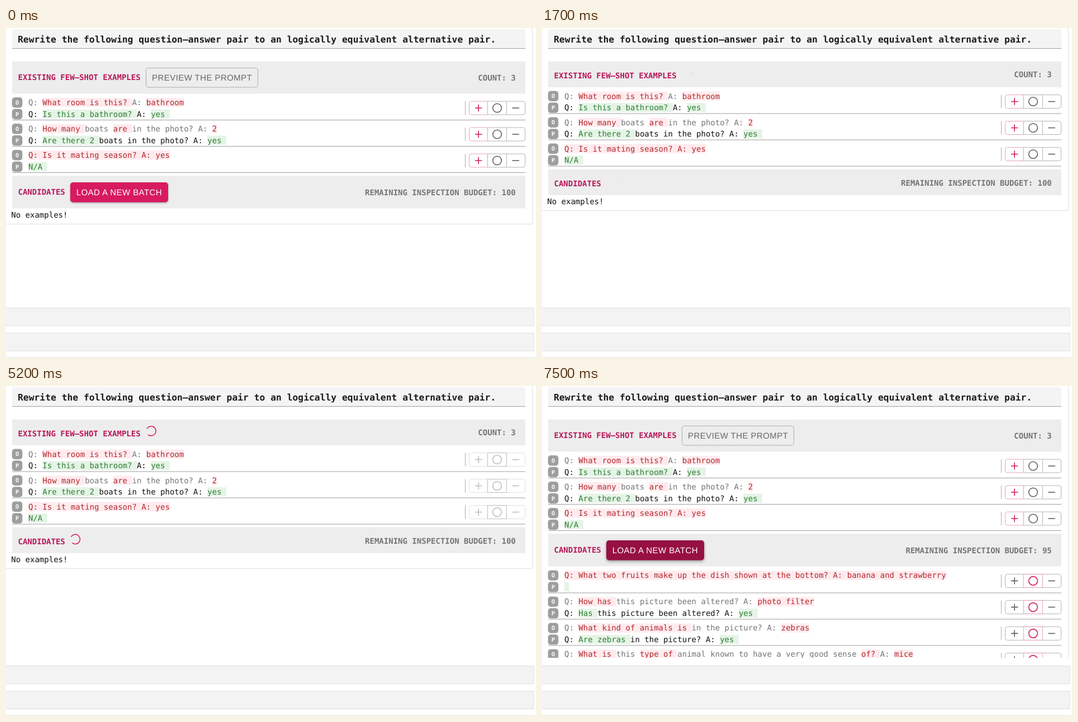
These frames come from a looping animation (948 px wide and 590 px high, 8.6 s). An HTML page:

```html
<!DOCTYPE html>
<html lang="en">
<head>
<meta charset="utf-8">
<title>Few-shot examples</title>
<style>
html, body { margin: 0; width: 100%; height: 100%; overflow: hidden; background: #fff; }
svg { display: block; width: 948px; height: 590px; }
text { font: 14px "DejaVu Sans Mono", monospace; white-space: pre; text-rendering: geometricPrecision; fill: #111; }
.title { font-size: 16.33px; font-weight: 700; fill: #1c1c1c; }
.head { font-weight: 700; fill: #b8185a; }
.count { font-weight: 700; fill: #757575; text-anchor: end; }
.btn { font: 15px "Liberation Sans", sans-serif; letter-spacing: .43px; text-anchor: middle; }
.badge { font-size: 10px; font-weight: 700; fill: #fff; text-anchor: middle; }
.old { fill: #757575; }
.del { fill: #b3272d; }
.ins { fill: #2e7d32; }
.line { stroke: #9e9e9e; }
.soft { stroke: #e0e0e0; fill: none; }
.icon { fill: none; stroke-width: 1.6; }
.on { opacity: var(--on); }
.off { opacity: calc(1 - var(--on)); }
</style>
</head>
<body>
<svg id="stage" viewBox="0 0 948 590"></svg>
<script>
const LOOP = 8600, HOVER = 1200, PRESS = 1450, LOAD = 1700, DONE = 7300, SPIN = 1420;
const CHAR = 8.428, PITCH = 47;
const PINK = '#d81b60', GREY = '#5f5f5f';

// Marked text: [changed words], everything else is unchanged.
const existing = [
  ['Q: [What room is this? ]A: [bathroom]', 'Q: [Is this a bathroom? ]A: [yes ]'],
  ['Q: [How many ]boats [are ]in the photo? A: [2]', 'Q: [Are there 2 ]boats in the photo? A: [yes ]'],
  ['[Q: Is it mating season? A: yes]', '[N/A ]']
];
const candidates = [
  ['[Q: What two fruits make up the dish shown at the bottom? A: banana and strawberry]', '[ ]'],
  ['Q: [How has ]this picture been altered? A: [photo filter]', 'Q: [Has ]this picture been altered? A: [yes ]'],
  ['Q: [What kind of animals is ]in the picture? A: [zebras]', 'Q: [Are zebras ]in the picture? A: [yes ]'],
  ['Q: [What is ]this [type of ]animal known to have a very good sense [of? ]A: [mice]', '']
];

const rect = (x, y, w, h, fill, extra = '') =>
  `<rect x="${x}" y="${y}" width="${w}" height="${h}" fill="${fill}" ${extra}/>`;
const label = (x, y, cls, str, extra = '') =>
  `<text x="${x}" y="${y}" class="${cls}" ${extra}>${str}</text>`;
const hline = (x1, x2, y, cls) => `<path class="${cls}" d="M${x1} ${y}H${x2}"/>`;

function diffLine(marked, y, plainCls, markCls, markFill) {
  let x = 40, boxes = '', spans = '';
  marked.split(/[\[\]]/).forEach((part, i) => {
    const w = part.length * CHAR;
    if (i % 2) boxes += rect(x, y - 13, w, 16.3, markFill);
    if (part) spans += `<tspan class="${i % 2 ? markCls : plainCls}">${part}</tspan>`;
    x += w;
  });
  return boxes + `<text x="40" y="${y}">${spans}</text>`;
}

const badge = (y, letter) =>
  rect(10.7, y - 9, 18.6, 18.4, '#9e9e9e', 'rx="5"') + label(20, y + 3.8, 'badge', letter);

// Plus, circle and minus cells; `pick` is the highlighted cell, -1 for disabled.
function choices(y, pick) {
  const cells = [
    `M861.5 ${y - 12}H832.5a4 4 0 0 0-4 4v16a4 4 0 0 0 4 4H861.5`,
    `M861.5 ${y - 12}H895.5V${y + 12}H861.5z`,
    `M895.5 ${y - 12}H924.5a4 4 0 0 1 4 4v16a4 4 0 0 1-4 4H895.5`
  ];
  const icons = [
    `M839 ${y}h12.4M845.2 ${y - 6.2}v12.4`,
    `M870.7 ${y}a7.8 7.8 0 1 0 15.6 0a7.8 7.8 0 1 0-15.6 0`,
    `M905.4 ${y}h12.4`
  ];
  const edge = i => pick < 0 ? (i === 1 ? '#bdbdbd' : '#e0e0e0') : i === pick ? '#e3a5bb' : '#b4b4b4';
  const ink = i => pick < 0 ? '#bdbdbd' : i === pick ? '#cf1b5f' : GREY;
  return [0, 2, 1].map(i =>
    `<path d="${cells[i]}" fill="none" stroke="${edge(i)}"/>` +
    `<path class="icon" d="${icons[i]}" stroke="${ink(i)}"/>`).join('') +
    (pick === 1 ? `<path d="${cells[1]}" fill="none" stroke="${edge(1)}"/>` : '');
}

function row([before, after], i, pick, canDisable) {
  const y = i * PITCH;
  const group = (cls, p) => `<g class="${cls}">${choices(143, p)}</g>`;
  return `<g transform="translate(0 ${y})">` +
    badge(133, 'O') + badge(153.8, 'P') +
    diffLine(before, 138, 'old', 'del', '#ffebee') +
    diffLine(after, 158.6, '', 'ins', '#e6f4e7') +
    '<path d="M821.5 131V155" stroke="#aaa"/>' +
    (canDisable ? group('on', pick) + group('off', -1) : group('', pick)) +
    hline(11, 929, 164.5, 'line') + '</g>';
}

const spinner = (x, y) =>
  `<g transform="translate(${x} ${y}) scale(.4243)"><circle class="spin" r="20.2" fill="none" stroke="${PINK}" stroke-width="3.6"/></g>`;

const stage = document.getElementById('stage');
stage.innerHTML =
  `<defs><clipPath id="view"><path d="M0 0H948V486H0z"/></clipPath>
   <clipPath id="face"><rect x="115" y="276" width="175" height="35.5" rx="4.7"/></clipPath></defs>` +
  rect(0, 0, 948, 590, '#fff') +
  '<path d="M11 36V7q0-5 5-5H924q5 0 5 5V36z" fill="#f4f4f4"/>' +
  hline(11, 929, 36.5, 'line') +
  label(21, 25.6, 'title', 'Rewrite the following question–answer pair to an logically equivalent alternative pair.') +
  rect(11, 60, 918, 57.5, '#ededed', 'id="bar1"') +
  label(21.5, 93, 'head', 'EXISTING FEW–SHOT EXAMPLES', 'id="head1"') +
  label(911.8, 94, 'count', 'COUNT: 3', 'id="count1"') +
  `<g id="rows">${existing.map((r, i) => row(r, i, 0, true)).join('')}</g>` +
  rect(11, 264, 918, 58.5, '#ededed', 'id="bar2"') +
  label(21.5, 298, 'head', 'CANDIDATES', 'id="head2"') +
  label(911.8, 299, 'count', '', 'id="count2"') +
  `<g id="buttons">
    ${rect(250.5, 71.5, 200, 34.5, 'none', 'rx="4.5" stroke="#adadad"')}
    ${label(350.7, 94.4, 'btn', 'PREVIEW THE PROMPT', 'style="fill:#666"')}
    ${rect(115, 276, 175, 35.5, PINK, 'id="face1" rx="4.7"')}
    <g clip-path="url(#face)"><circle id="ripple" cx="215" cy="294" fill="#fff"/></g>
    ${label(202.4, 299.2, 'btn', 'LOAD A NEW BATCH', 'style="fill:#fff"')}
  </g>` +
  `<g id="spinners">${spinner(259.6, 80.5)}${spinner(123.9, 273.9)}</g>` +
  label(9.3, 339, '', 'No examples!', 'id="empty"') +
  `<g id="results" clip-path="url(#view)"><g transform="translate(0 205.4)">${candidates.map((r, i) => row(r, i, 1)).join('')}</g></g>` +
  '<path id="frame" class="soft"/>' +
  [500.5, 545.5].map(y => rect(-1, y, 945, 32, '#f3f3f3', 'stroke="#e0e0e0"')).join('') +
  hline(0, 946, 589.5, 'soft');

const el = id => document.getElementById(id);
const show = (id, yes) => el(id).setAttribute('visibility', yes ? 'visible' : 'hidden');
const set = (id, name, value) => el(id).setAttribute(name, value);
const ramp = (t, from, span) => Math.min(1, Math.max(0, (t - from) / span));

// cubic-bezier(.42, 0, .58, 1)
function easeInOut(x) {
  let lo = 0, hi = 1, s = .5;
  for (let i = 0; i < 20; i++) {
    const u = 1 - s;
    if (3 * u * u * s * .42 + 3 * u * s * s * .58 + s * s * s < x) lo = s; else hi = s;
    s = (lo + hi) / 2;
  }
  return s * s * (3 - 2 * s);
}

function mix(a, b, k) {
  return `rgb(${a.map((v, i) => Math.round(v + (b[i] - v) * k))})`;
}

function drawSpinners(t) {
  const p = (t - LOAD) / SPIN % 1;
  const grow = easeInOut(Math.min(1, p * 2)), slide = easeInOut(Math.max(0, p * 2 - 1));
  for (const c of document.querySelectorAll('.spin')) {
    c.setAttribute('stroke-dasharray', `${1 + 99 * grow} 200`);
    c.setAttribute('stroke-dashoffset', -15 * grow - 110 * slide);
    c.setAttribute('transform', `rotate(${360 * p})`);
  }
}

function draw(t) {
  const busy = t >= LOAD && t < DONE, done = t >= DONE;

  set('bar1', 'height', busy ? 46 : 57.5);
  set('head1', 'y', busy ? 89.6 : 93);
  set('count1', 'y', busy ? 88.4 : 94);
  set('rows', 'transform', `translate(0 ${busy ? -11.5 : 0})`);
  set('bar2', 'y', busy ? 252.5 : 264);
  set('bar2', 'height', busy ? 46.5 : 58.5);
  set('head2', 'y', busy ? 283 : 298);
  set('count2', 'y', busy ? 281.5 : 299);
  el('count2').textContent = 'REMAINING INSPECTION BUDGET: ' + (done ? 95 : 100);
  set('empty', 'y', busy ? 315 : 339);
  set('frame', 'd', done ? 'M941.5 0V486' : `M941.5 0V${busy ? 326.5 : 350.5}H0`);

  show('buttons', !busy);
  show('spinners', busy);
  show('empty', !done);
  show('results', done);

  const on = done ? ramp(t, DONE - 50, 150) : 1 - ramp(t, LOAD, 250);
  stage.style.setProperty('--on', on);

  const hover = easeInOut(done ? ramp(t, DONE, 200) : ramp(t, HOVER, 250));
  set('face1', 'fill', mix([216, 27, 96], [151, 16, 66], hover));
  el('face1').style.filter =
    `drop-shadow(0 ${1.6 + hover}px ${1.6 + hover}px rgba(0,0,0,.38))`;
  const wave = ramp(t, PRESS, 400);
  set('ripple', 'r', 110 * wave);
  set('ripple', 'opacity', done ? 0 : .3);

  if (busy) drawSpinners(t);
}

const start = performance.now();
function tick() {
  const t = (performance.now() - start) % LOOP;
  draw(Math.floor(t / 100) * 100);
  requestAnimationFrame(tick);
}
tick();
</script>
</body>
</html>
```
